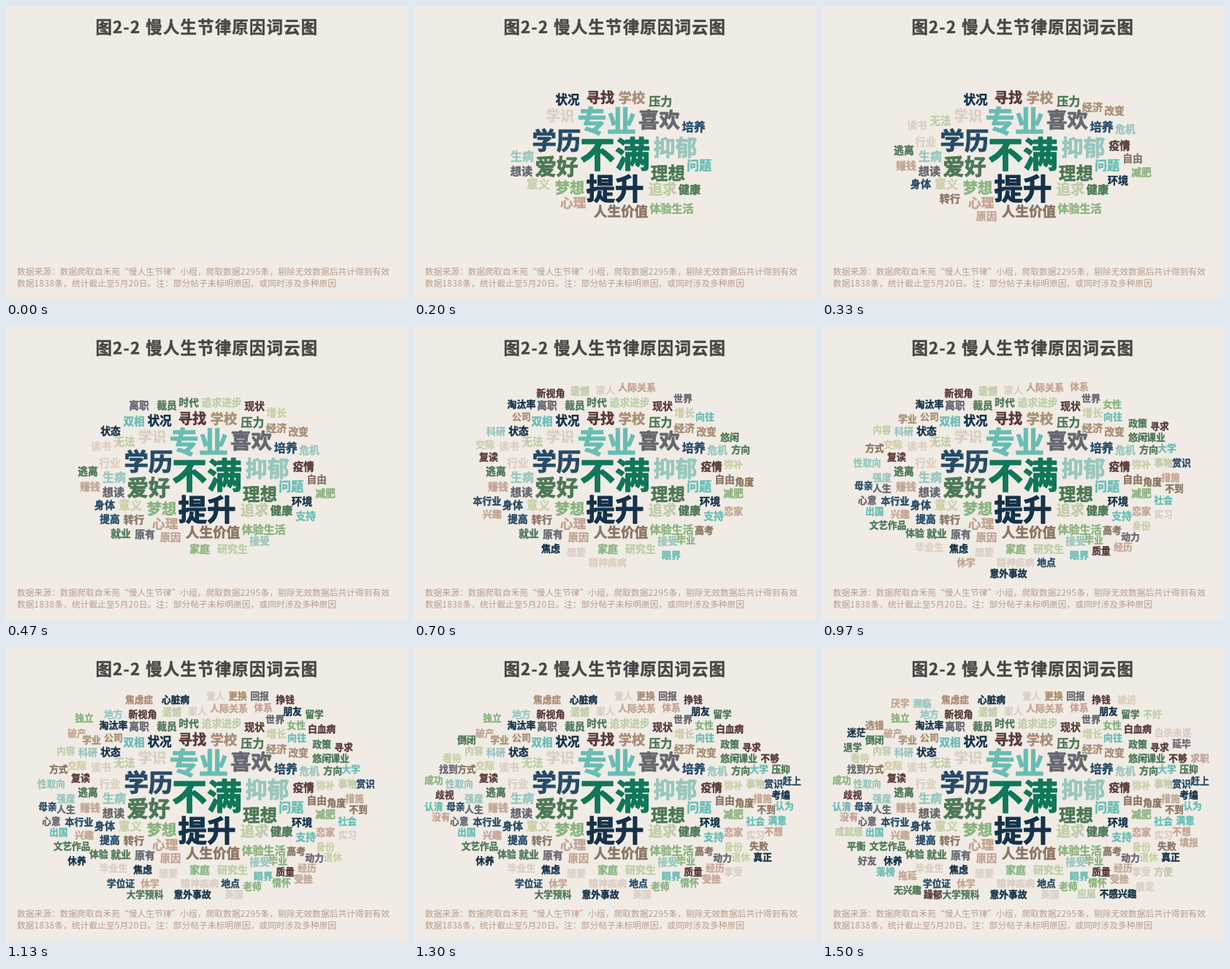
An HTML page with a canvas that plays this animation: 550x400 px, repeating every 8000 ms.

```html
<!DOCTYPE html>
<html lang="zh-CN">
<head>
<meta charset="utf-8">
<title>词云图</title>
<style>
html, body { margin: 0; width: 100%; height: 100%; overflow: hidden; background: #f0ece5; }
canvas { display: block; }
</style>
</head>
<body>
<canvas id="stage" width="550" height="400"></canvas>
<script>
const ctx = document.getElementById('stage').getContext('2d');
const LOOP = 8000;
const FAMILY = '"Noto Sans CJK SC", "Noto Sans CJK", sans-serif';
const COLORS = {
  green: '#10775b', teal: '#68bdb3', navy: '#14324a', blue: '#264b68',
  forest: '#4d7857', mint: '#98c6bd', slate: '#66676f', sage: '#c0cda8',
  leaf: '#8ab37e', wine: '#593a38', tan: '#a98c72', pale: '#dccec3',
  rose: '#c3a494', brown: '#8b7563', lime: '#cbcfa6'
};
const words = [];

// Words of a batch appear one by one until the given step of a 30 Hz clock.
function addWords(lastStep, size, list) {
  const first = words.length ? words[words.length - 1].step : 0;
  list.forEach(([text, x, y, color, ownSize], i) => words.push({
    text, x, y, color: COLORS[color], size: ownSize || size,
    step: first + (lastStep - first) * (i + 1) / list.length
  }));
}

// Equal-sized words grow outward from the middle of the ellipse.
const outward = list => list.sort((a, b) => spread(a) - spread(b));
const spread = ([, x, y]) => Math.hypot((x - 275) / 260, (y - 202) / 142);

addWords(6, 16, [
  ['不满', 275, 202, 'green', 48], ['专业', 263.7, 156.7, 'teal', 40.3],
  ['提升', 275, 249, 'navy', 39.5], ['学历', 195, 183, 'blue', 33.5],
  ['抑郁', 357.5, 193, 'mint', 30], ['爱好', 195, 218.5, 'forest', 29.5],
  ['喜欢', 335.5, 155.5, 'slate', 28.4], ['理想', 347.5, 228, 'forest', 23.4],
  ['梦想', 213, 248, 'leaf', 20.2], ['追求', 340, 250, 'sage', 19.2],
  ['寻找', 255, 125, 'wine', 19.2], ['学识', 200, 150, 'pale', 19.2],
  ['人生价值', 283, 280, 'brown', 18.6], ['学校', 298, 125, 'tan', 18.2],
  ['心理', 217.7, 268, 'rose', 17.6], ['问题', 390, 218, 'teal', 17.1],
  ['状况', 210, 128, 'navy', 16.6], ['培养', 382.7, 165, 'blue', 16],
  ['意义', 170, 243, 'lime', 16.2], ['压力', 337.3, 130, 'forest'],
  ['生病', 148, 205, 'mint'], ['想读', 147, 225, 'slate', 15.2],
  ['健康', 377, 250, 'forest', 15.2], ['体验生活', 352.5, 276, 'leaf', 15]
]);

addWords(14, 13.8, outward([
  ['离职', 182, 107, 'slate'], ['裁员', 220, 107, 'forest'], ['时代', 250, 103, 'forest'],
  ['追求进步', 295, 103, 'sage'], ['现状', 340, 108, 'wine'], ['增长', 370, 117, 'lime'],
  ['双相', 175, 128, 'teal', 14.6], ['经济', 370, 138, 'tan', 14.2], ['改变', 400, 143, 'tan'],
  ['状态', 143, 142, 'navy'], ['无法', 162, 156, 'sage', 14.6], ['读书', 130, 163, 'pale'],
  ['危机', 415, 168, 'mint'], ['行业', 142, 185, 'pale', 14.6], ['疫情', 407, 190, 'wine', 14.6],
  ['逃离', 112, 197, 'forest'], ['自由', 425, 208, 'brown'], ['赚钱', 115, 218, 'rose'],
  ['减肥', 437, 227, 'leaf'], ['身体', 135, 243, 'blue', 14.2], ['环境', 405, 238, 'navy', 14.2],
  ['提高', 142, 262, 'blue'], ['转行', 175, 263, 'brown', 14.2], ['支持', 410, 258, 'teal'],
  ['就业', 157, 282, 'forest'], ['原有', 190, 283, 'slate'], ['原因', 225, 287, 'rose', 14.2],
  ['家庭', 265, 303, 'leaf'], ['研究生', 310, 303, 'sage'], ['接受', 347, 292, 'mint']
]));

addWords(21, 13, outward([
  ['新视角', 187, 90, 'wine'], ['遗憾', 227, 87, 'sage'], ['家人', 262, 86, 'pale'],
  ['人际关系', 305, 82, 'rose'], ['世界', 368, 97, 'slate'], ['淘汰率', 147, 105, 'navy'],
  ['公司', 147, 122, 'tan'], ['向往', 398, 122, 'teal'], ['科研', 112, 142, 'mint'],
  ['悠闲', 432, 150, 'forest'], ['交际', 97, 160, 'lime'], ['方向', 447, 167, 'forest'],
  ['复读', 102, 177, 'wine'], ['弥补', 437, 187, 'lime'], ['角度', 452, 211, 'brown'],
  ['本行业', 100, 237, 'blue'], ['兴趣', 107, 255, 'rose'], ['恋家', 437, 251, 'rose'],
  ['高考', 397, 277, 'brown'], ['毕业', 372, 290, 'leaf'], ['焦虑', 187, 302, 'navy'],
  ['想要', 222, 307, 'pale'], ['精神疾病', 265, 321, 'pale'], ['眼界', 352, 311, 'teal']
]));

addWords(25, 12.8, outward([
  ['体系', 352, 81, 'rose'], ['女性', 397, 105, 'leaf'], ['学业', 117, 125, 'tan'],
  ['政策', 432, 131, 'forest'], ['事物', 467, 185, 'sage'], ['强度', 82, 205, 'mint'],
  ['人生', 82, 220, 'slate'], ['社会', 467, 236, 'teal'], ['体验', 127, 281, 'forest'],
  ['身份', 437, 271, 'lime'], ['毕业生', 147, 300, 'pale'], ['质量', 382, 305, 'wine'],
  ['休学', 197, 321, 'rose'], ['地点', 307, 321, 'blue'], ['意外事故', 255, 336, 'navy']
]));

addWords(34, 12.7, outward([
  ['焦虑症', 182, 70, 'tan'], ['心脏病', 232, 70, 'navy'], ['爱人', 287, 65, 'pale'],
  ['更换', 317, 65, 'tan'], ['回报', 347, 65, 'slate'], ['挣钱', 382, 70, 'wine'],
  ['独立', 107, 95, 'leaf'], ['地方', 147, 90, 'mint'], ['朋友', 392, 86, 'navy'],
  ['留学', 422, 90, 'forest'], ['破产', 97, 116, 'rose'], ['白血病', 432, 110, 'wine'],
  ['寻求', 462, 135, 'wine'], ['内容', 82, 140, 'sage'], ['课业', 457, 150, 'forest'],
  ['方式', 72, 165, 'brown'], ['大学', 472, 165, 'teal'], ['性取向', 62, 185, 'mint'],
  ['赏识', 492, 185, 'blue'], ['母亲', 57, 216, 'blue'], ['措施', 477, 205, 'rose'],
  ['不到', 482, 220, 'brown'], ['心意', 62, 236, 'slate'], ['出国', 72, 251, 'teal'],
  ['文艺作品', 90, 270, 'forest'], ['实习', 467, 255, 'pale'], ['动力', 422, 286, 'slate'],
  ['退休', 447, 285, 'lime'], ['休养', 97, 290, 'navy'], ['受挫', 407, 315, 'rose'],
  ['经历', 412, 300, 'rose'], ['老师', 337, 325, 'leaf'], ['情怀', 377, 320, 'leaf'],
  ['英国', 312, 336, 'pale'], ['学位证', 157, 321, 'blue'], ['大学预科', 190, 336, 'forest']
]));

addWords(45, 12.7, outward([
  ['厌学', 107, 75, 'rose'], ['濒临', 137, 75, 'mint'], ['被迫', 417, 70, 'pale'],
  ['不好', 452, 90, 'sage'], ['选错', 72, 105, 'tan'], ['自杀未遂', 480, 115, 'pale'],
  ['迷茫', 47, 115, 'navy'], ['倒闭', 72, 125, 'forest'], ['退学', 42, 135, 'forest'],
  ['延毕', 492, 130, 'slate'], ['看待', 52, 150, 'lime'], ['不够', 487, 150, 'wine'],
  ['求职', 517, 150, 'rose'], ['找到', 47, 165, 'slate'], ['压抑', 502, 165, 'forest'],
  ['成功', 27, 180, 'leaf'], ['歧视', 42, 200, 'wine'], ['赶上', 517, 181, 'blue'],
  ['认清', 27, 216, 'teal'], ['考编', 502, 200, 'navy'], ['没有', 37, 230, 'rose'],
  ['认为', 507, 215, 'teal'], ['成就感', 37, 250, 'sage'], ['满意', 497, 235, 'teal'],
  ['平衡', 47, 270, 'forest'], ['不想', 492, 250, 'rose'], ['填报', 502, 265, 'rose'],
  ['好友', 62, 290, 'slate'], ['失败', 472, 270, 'brown'], ['真正', 477, 285, 'navy'],
  ['落榜', 87, 305, 'teal'], ['拖延', 117, 310, 'rose'], ['享受', 437, 305, 'pale'],
  ['方便', 467, 305, 'sage'], ['无兴趣', 117, 330, 'forest'], ['躁郁', 152, 336, 'wine'],
  ['应届', 362, 335, 'sage'], ['不感兴趣', 405, 335, 'navy'], ['稳定', 442, 325, 'pale']
]));

// y is the middle of the em box; heft thickens the strokes, in em.
function drawText(text, x, y, { size, color, weight = 'bold', align = 'left', spacing = 0, heft = 0 }) {
  ctx.font = `${weight} ${size}px ${FAMILY}`;
  ctx.letterSpacing = `${spacing}px`;
  ctx.textAlign = align;
  ctx.fillStyle = ctx.strokeStyle = color;
  ctx.fillText(text, x, y + size * 0.38);
  if (heft) {
    ctx.lineWidth = size * heft;
    ctx.strokeText(text, x, y + size * 0.38);
  }
}

const titleStyle = { size: 22.4, color: '#474747', spacing: 1.2, heft: 0.02 };
const noteStyle = { size: 11.75, color: '#ba9b8a', weight: 'normal' };
const digitStyle = { ...noteStyle, spacing: 0.5 };

function drawWord({ text, x, y, size, color }) {
  drawText(text, x, y, { size, color, align: 'center', heft: 0.03 });
}

// Each part of a line starts where the one before it ends.
function drawLine(parts, x, y) {
  for (const part of parts) {
    drawText(part, x, y, /^\d+$/.test(part) ? digitStyle : noteStyle);
    x += ctx.measureText(part).width;
  }
}

function draw(time) {
  ctx.fillStyle = '#f0ece5';
  ctx.fillRect(0, 0, 550, 400);
  ctx.lineJoin = 'round';

  drawText('图2-2', 122.5, 28.7, titleStyle);
  drawText('慢人生节律原因词云图', 191.3, 28.7, titleStyle);

  drawLine(['数据来源：数据爬取自禾苑“慢人生节律”小组，爬取数据', '2295',
    '条，剔除无效数据后共计得到有效'], 15, 363);
  drawLine(['数据', '1838', '条，统计截止至', '5', '月', '20',
    '日。注：部分帖子未标明原因，或同时涉及多种原因'], 15, 379);

  const step = Math.floor((time + 4) * 0.03) + 1e-6;
  words.filter(word => word.step <= step).forEach(drawWord);
}

const start = performance.now();
function tick() {
  draw((performance.now() - start) % LOOP);
  requestAnimationFrame(tick);
}
tick();
</script>
</body>
</html>
```
